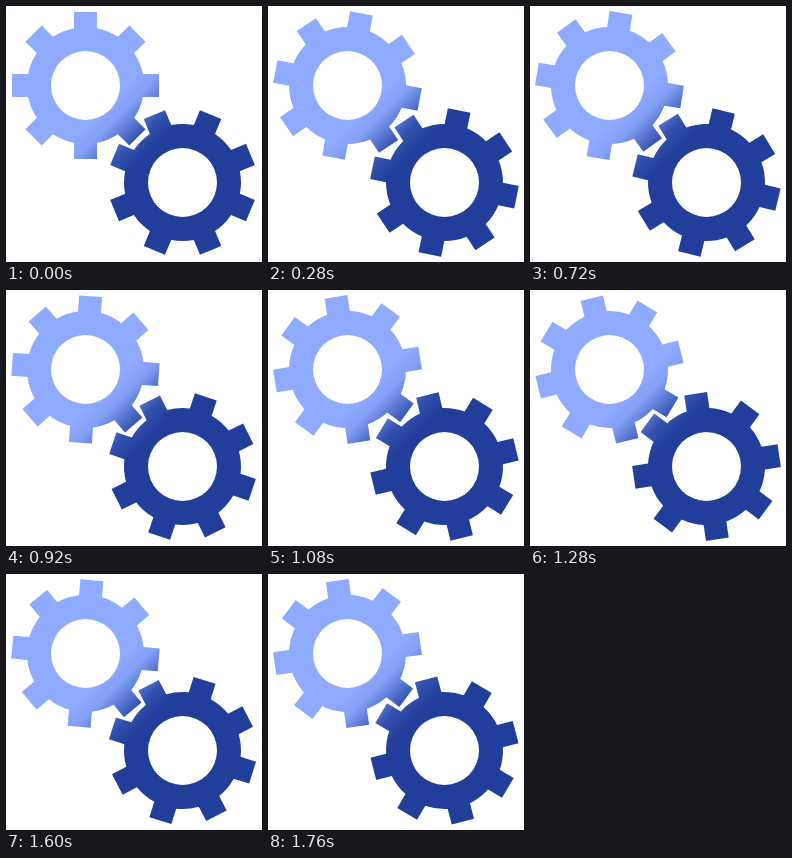
These frames come from a looping animation (256 by 256 pixels, 1.8 s). An HTML page with a canvas:

```html
<!DOCTYPE html>
<html lang="en">
<head>
<meta charset="utf-8">
<title>Gears</title>
<style>
  html, body { margin: 0; height: 100%; overflow: hidden; background: #fff; }
  canvas { display: block; width: 100vw; height: 100vh; }
</style>
</head>
<body>
<canvas width="256" height="256"></canvas>
<script>
const ctx = document.querySelector('canvas').getContext('2d');
const LOOP = 1800, STEP = 40, TEETH = 8;
const HOLE = 34.5, BODY = 58.5, TIP = 73.5, HALF = 11.5;
const baseAngle = Math.asin(HALF / BODY);
const tipAngle = Math.atan2(HALF, TIP);
const tipRadius = Math.hypot(HALF, TIP);

// The shading stays fixed on the stage while the gears turn through it.
const shade = ctx.createLinearGradient(98, 98, 145, 145);
shade.addColorStop(0, '#8fabff');
shade.addColorStop(0.28, '#84a1f7');
shade.addColorStop(0.72, '#3453af');
shade.addColorStop(1, '#203e9a');

function gear(c, turn) {
  const pitch = 2 * Math.PI / TEETH;
  ctx.beginPath();
  for (let i = 0; i < TEETH; i++) {
    const a = turn + i * pitch;
    for (const side of [-tipAngle, tipAngle]) {
      ctx.lineTo(c + tipRadius * Math.cos(a + side), c + tipRadius * Math.sin(a + side));
    }
    ctx.arc(c, c, BODY, a + baseAngle, a + pitch - baseAngle);
  }
  ctx.closePath();
  ctx.moveTo(c + HOLE, c);
  ctx.arc(c, c, HOLE, 0, 2 * Math.PI);
  ctx.fill('evenodd');
}

function draw(now) {
  const t = Math.floor(now % LOOP / STEP) * STEP;
  const turn = 2 * Math.PI * t / LOOP;
  ctx.clearRect(0, 0, 256, 256);
  ctx.fillStyle = shade;
  gear(79.5, turn);
  gear(176.5, Math.PI / TEETH - turn);
}

let start;
function tick(now) {
  start ??= now;
  draw(now - start);
  requestAnimationFrame(tick);
}
draw(0);
requestAnimationFrame(tick);
</script>
</body>
</html>
```
